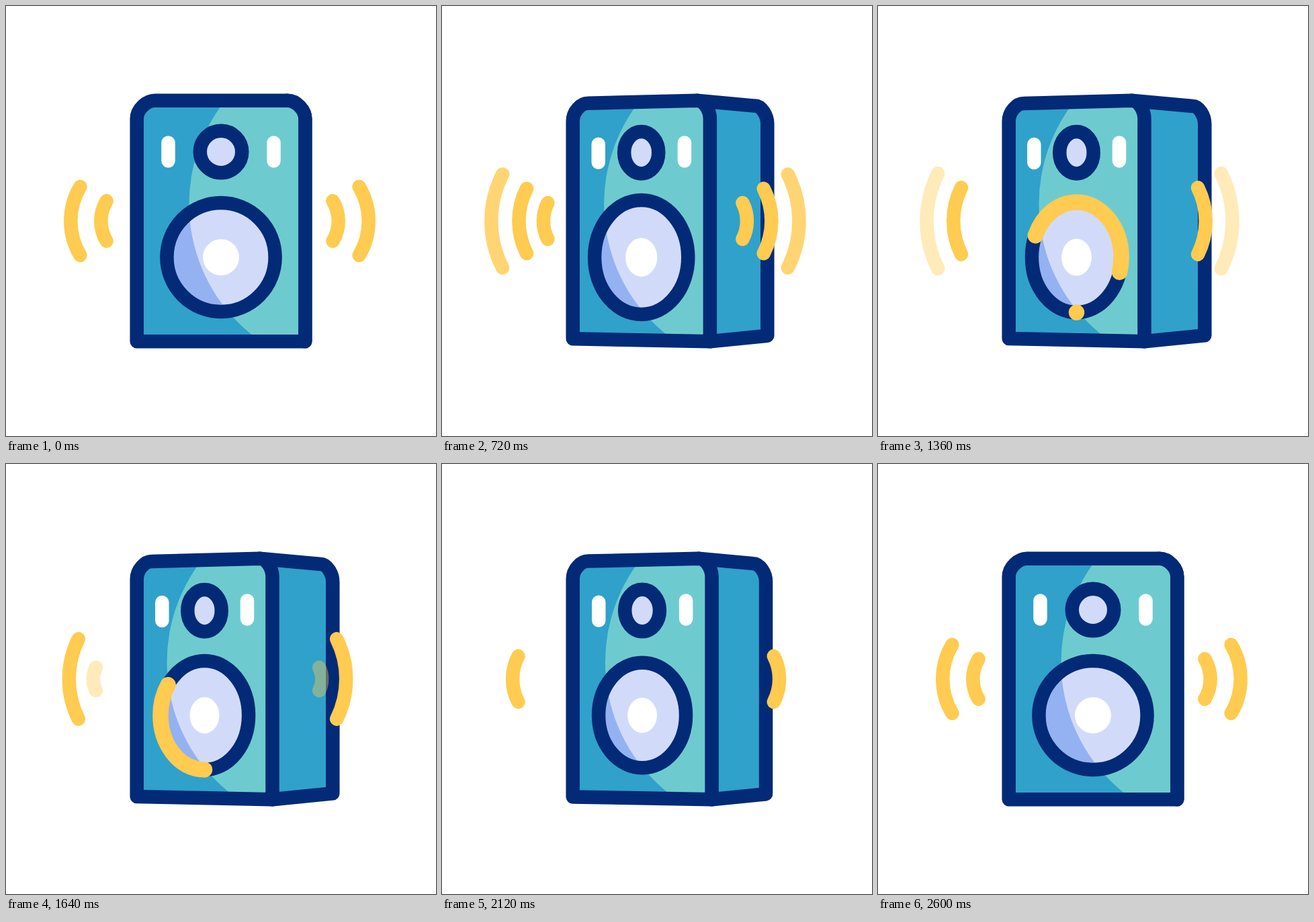
Write an HTML page that moves like this. It is 640x640 px and loops after 3000 ms.

```html
<!DOCTYPE html>
<html lang="en">
<head>
<meta charset="utf-8">
<title>Speaker</title>
<style>
  html, body { margin: 0; width: 100%; height: 100%; overflow: hidden; background: #fff; }
  svg { display: block; width: 100vw; height: 100vh; }
  .line { stroke: #032a76; stroke-width: 20.5; stroke-linejoin: round; }
  .slot { stroke: #fff; stroke-width: 20.5; stroke-linecap: round; }
  .wave { fill: none; stroke: #ffcb50; stroke-width: 20.5; stroke-linecap: round; }
</style>
</head>
<body>
<svg viewBox="0 0 640 640">
  <defs>
    <clipPath id="bodyClip"><path id="bodyShape"/></clipPath>
    <clipPath id="coneClip"><ellipse id="coneShape"/></clipPath>
  </defs>
  <path id="side" class="line" fill="#30a1ca"/>
  <path id="front" fill="#30a1ca"/>
  <g clip-path="url(#bodyClip)"><circle id="bodyLight" cy="295" r="249" fill="#6dcbcf"/></g>
  <path id="frame" class="line" fill="none"/>
  <path id="slotL" class="slot"/>
  <path id="slotR" class="slot"/>
  <ellipse id="tweeter" class="line" fill="#d1dbf9"/>
  <ellipse id="cone" fill="#94b2f1"/>
  <g clip-path="url(#coneClip)"><circle id="coneLight" cy="295" r="249" fill="#d1dbf9"/></g>
  <ellipse id="ring" class="line" fill="none"/>
  <ellipse id="cap" fill="#fff"/>
  <path id="sweep" class="wave" style="stroke-width:23.5" pathLength="1000"/>
  <g id="waves"></g>
</svg>
<script>
const LOOP = 3000, START = 200, END = 2600, LIFE = 1600, CY = 374;
const $ = id => document.getElementById(id);
const clamp = v => Math.min(1, Math.max(0, v));
const smooth = v => { v = clamp(v); return v * v * (3 - 2 * v); };
const same = v => v;
const set = (el, attrs) => { for (const k in attrs) el.setAttribute(k, attrs[k]); };
const oval = (id, cx, cy, rx, ry) => set($(id), { cx, cy, rx, ry });

// keys: time, value, time, value, ...
function tween(keys, t, ease) {
  if (t <= keys[0]) return keys[1];
  for (let i = 2; i < keys.length; i += 2) {
    if (t < keys[i]) {
      const k = ease((t - keys[i - 2]) / (keys[i] - keys[i - 2]));
      return keys[i - 1] + (keys[i + 1] - keys[i - 1]) * k;
    }
  }
  return keys[keys.length - 1];
}

// birth time and half distance between the left and right arcs
const waves = [
  { born: -800, reach: [200, 232, 800, 240.5] },
  { born: -200, reach: [200, 187, 800, 200, 1400, 240.5] },
  { born: 400, reach: [400, 153, 800, 164, 1400, 200.5, 2000, 240.5] },
  { born: 1600, reach: [1600, 178, 2000, 203, 2600, 232] },
  { born: 2200, reach: [2200, 164.5, 2600, 187] }
];
for (const w of waves) {
  w.el = document.createElementNS("http://www.w3.org/2000/svg", "path");
  w.el.setAttribute("class", "wave");
  $("waves").append(w.el);
}

// quarter turn from a vertical edge to a horizontal one, or back
const K = 0.5523;
const upThenAcross = (x0, y0, x1, y1) =>
  `C${x0} ${y0 + (y1 - y0) * K} ${x1 + (x0 - x1) * (1 - K)} ${y1} ${x1} ${y1}`;
const acrossThenDown = (x0, y0, x1, y1) =>
  `C${x0 + (x1 - x0) * K} ${y0} ${x1} ${y1 + (y0 - y1) * (1 - K)} ${x1} ${y1}`;

function drawBody(p) {
  const left = 194.7, top = 140.7, base = 499.3;
  const edge = 445.3 - 48.8 * p, far = 445.3 + 41 * p;
  const bend = 418.3 - 40.8 * p, farBend = 418.3 + 49.7 * p;
  const front = `M${left} ${base - 4.3 * p}V${168 + 3.5 * p}` +
    upThenAcross(left, 168 + 3.5 * p, left + 27 - 5 * p, top + 4.3 * p) +
    `L${bend} ${top}` + acrossThenDown(bend, top, edge, 167.7) + `V${base}Z`;
  const side = `M${bend} ${top}L${farBend} ${top + 8.3 * p}` +
    acrossThenDown(farBend, top + 8.3 * p, far, 167.7 + 8 * p) +
    `V${base - 9 * p}L${edge} ${base}Z`;
  for (const id of ["front", "frame", "bodyShape"]) set($(id), { d: front });
  set($("side"), { d: side });
  set($("bodyLight"), { cx: 521.5 - 33 * p });
  set($("coneLight"), { cx: 521.5 - 33 * p });
  set($("slotL"), { d: `M${241.5 - 9.2 * p} ${203.5 + 2.4 * p}v27` });
  set($("slotR"), { d: `M${398.5 - 39.5 * p} 203.5v27` });
  oval("tweeter", 320 - 24.5 * p, 217 + 1.2 * p, 31.25 - 6 * p, 31.25);
}

// dip, swell and settle; there is no beat between 1400 and 2000
function beat(t, lag, peak) {
  if (t > 1400 + lag && t < 2000) return 1;
  const s = (t - START) % 600;
  return tween([lag, 1, 200 + lag, 0.95, 400 + lag, peak, 600, 1], s, smooth);
}

function drawWoofer(t, p) {
  const cx = 320 - 24.5 * p;
  const b = beat(t, 0, 1.14), c = beat(t, 15, 1.155);
  const rx = (80.6 - 15 * p) * b, ry = 80.9 * b;
  for (const id of ["ring", "cone", "coneShape"]) oval(id, cx, CY, rx, ry);
  oval("cap", cx, CY, (27 - 5 * p) * c, 27 * c);

  const head = smooth((t - 800) / 900), tail = smooth((t - 1100) / 900);
  const arc = `A${rx} ${ry} 0 0 0 ${cx} `;
  set($("sweep"), {
    d: `M${cx} ${CY + ry}${arc}${CY - ry}${arc}${CY + ry}`,
    "stroke-dasharray": `0 ${tail * 1000} ${(head - tail) * 1000} 2000`,
    visibility: head > tail ? "visible" : "hidden"
  });
}

function drawWaves(t, turn) {
  const mid = 318 - 18 * turn;
  for (const w of waves) {
    const age = t - w.born;
    const h = 15.7 + 0.0354 * age;
    const depth = (0.275 - 0.04 * turn) * h;
    const r = (h * h + depth * depth) / (2 * depth);
    const x = tween(w.reach, t, same) - 10.3 - depth;
    const arc = (at, flag) => `M${at} ${320 - h}A${r} ${r} 0 0 ${flag} ${at} ${320 + h}`;
    const alive = age > 0 && age < LIFE;
    set(w.el, {
      d: alive ? arc(mid - x, 0) + arc(mid + x, 1) : "",
      opacity: clamp(Math.min(age, LIFE - age) / 100)
    });
  }
}

function draw(ms) {
  const step = Math.floor((ms % LOOP) / 20) * 20;
  const t = Math.min(END, Math.max(START, step));
  const there = (t - 200) / 600, back = (t - 2000) / 600;
  const p = smooth(there) - smooth(back);
  drawBody(p);
  drawWoofer(t, p);
  drawWaves(t, clamp(there) - clamp(back));
}

let origin;
function tick(now) {
  if (origin === undefined) origin = now;
  draw(Math.max(0, now - origin));
  requestAnimationFrame(tick);
}
draw(0);
requestAnimationFrame(tick);
</script>
</body>
</html>
```
